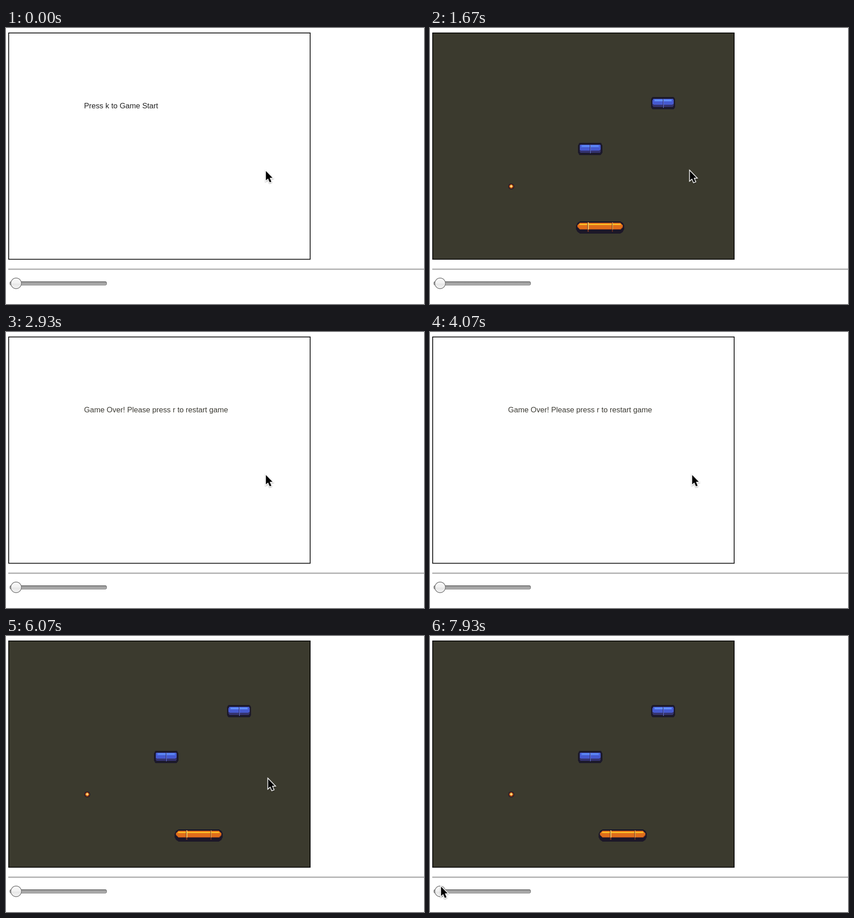
Write an HTML page that moves like this. It is 921 px wide and 608 px high and loops after 8 s.

```html
<!DOCTYPE html>
<html lang="en">
<head>
<meta charset="utf-8">
<title>Block game</title>
<style>
html, body { margin: 0; width: 100%; height: 100%; overflow: hidden; background: #fff; }
svg { display: block; width: 921px; height: 608px; }
text { font: 16.6px "Liberation Sans", Arial, sans-serif; filter: blur(.35px); }
.art { shape-rendering: crispEdges; }
#start, #game, #over, #paddle, #ball, #cursor { animation: 8s step-end infinite; }

#start { animation-name: start; }
#game { animation-name: game; }
#over { animation-name: over; }
#paddle { animation-name: paddle; }
#ball { animation-name: ball; }
#cursor { animation-name: cursor; }

@keyframes start {
  0% { visibility: visible; }
  .875%, 100% { visibility: hidden; }
}
@keyframes game {
  0%, 36.625% { visibility: hidden; }
  .875%, 55.875%, 100% { visibility: visible; }
}
@keyframes over {
  0%, 55.875%, 100% { visibility: hidden; }
  36.625% { visibility: visible; }
}
/* one key press moves the paddle 49.8px */
@keyframes paddle {
  0% { transform: translateX(0); }
  12.5% { transform: translateX(49.8px); }
  13.375% { transform: translateX(99.6px); }
  20.875% { transform: translateX(149.4px); }
  21.625% { transform: translateX(199.2px); }
  22.5% { transform: translateX(249px); }
  25% { transform: translateX(199.2px); }
  25.875% { transform: translateX(149.4px); }
  26.625% { transform: translateX(99.6px); }
  27.5% { transform: translateX(49.8px); }
  28.375% { transform: translateX(0); }
  29.125% { transform: translateX(-49.8px); }
  30% { transform: translateX(-99.6px); }
  30.875% { transform: translateX(-149.4px); }
  31.625% { transform: translateX(-164.8px); }
  36.625% { transform: translateX(0); }
  71.625% { transform: translateX(49.8px); }
  72.5% { transform: translateX(99.6px); }
  74.125% { transform: translateX(149.4px); }
  75%, 100% { transform: translateX(199.2px); }
}
@keyframes ball {
  0% { transform: none; }
  35.875% { transform: translate(49.8px, 49.8px); }
  36.625%, 100% { transform: none; }
}
@keyframes cursor {
  0% { transform: translate(572.6px, 315px); }
  49.125% { transform: translate(574px, 315px); }
  50% { transform: translate(576px, 315px); }
  50.875% { transform: translate(577.6px, 315px); }
  87.5% { transform: translate(570px, 320px); }
  88.375% { transform: translate(540px, 346px); }
  89.125% { transform: translate(478px, 396px); }
  90% { transform: translate(395px, 453px); }
  90.875% { transform: translate(308px, 503px); }
  91.625% { transform: translate(228px, 537px); }
  92.5% { transform: translate(163px, 557px); }
  93.375% { transform: translate(112px, 565px); }
  94.125% { transform: translate(76px, 566px); }
  95.875% { transform: translate(54px, 560px); }
  97.5% { transform: translate(40px, 553px); }
  98.375% { transform: translate(29px, 552px); }
  99.125%, 100% { transform: translate(24.3px, 552px); }
}
</style>
</head>
<body>
<svg viewBox="0 0 921 608" xmlns="http://www.w3.org/2000/svg">
  <defs>
    <linearGradient id="track" x2="0" y2="1">
      <stop offset="0" stop-color="#858585"/>
      <stop offset="1" stop-color="#c2c2c2"/>
    </linearGradient>
    <linearGradient id="knob" x2="0" y2="1">
      <stop offset="0" stop-color="#fafafa"/>
      <stop offset=".5" stop-color="#f1f1f1"/>
      <stop offset=".52" stop-color="#e6e6e6"/>
      <stop offset="1" stop-color="#f4f4f4"/>
    </linearGradient>
    <filter id="shade" x="-50%" y="-50%" width="200%" height="200%">
      <feDropShadow dx="0" dy="1.2" stdDeviation="1.1" flood-opacity=".4"/>
    </filter>
    <!-- sprites on a 16-unit-high pixel grid -->
    <g id="block" class="art">
      <path d="M2 0H30L31 1 32 3V13L31 15 30 16H2L1 15 0 13V3L1 1Z" fill="#1c192a"/>
      <path d="M3 2H29L30 4V11L29 13H3L2 11V4Z" fill="#35336f"/>
      <path d="M3 2H29L30 4V9L28 10H4L2 9V4Z" fill="#4659cf"/>
      <path d="M4 3H28V6H4Z" fill="#4f73ea"/>
      <path d="M5 3.5H27V5H5Z" fill="#6491f8"/>
      <path d="M15.4 2H16V14H15.4Z" fill="#292657"/>
      <path d="M16 2H16.7V14H16Z" fill="#6f83df"/>
    </g>
    <g id="bar" class="art">
      <path d="M5 0H59L62 2 64 6V10L62 14 59 16H5L2 14 0 10V6L2 2Z" fill="#1c1728"/>
      <path d="M5 2H59L62 5V8L59 11H5L2 8V5Z" fill="#9e451d"/>
      <path d="M5 2H59L62 5V7L59 10H5L2 7V5Z" fill="#df6d1b"/>
      <path d="M5 3H59L61 5H3Z" fill="#f49a1d"/>
      <path d="M5 3.4H59V5H5Z" fill="#ffca2a"/>
      <path d="M15 1.5H15.9V14H15ZM47.3 1.5H48.2V14H47.3Z" fill="#55241e"/>
      <path d="M15.9 1.5H16.7V11H15.9ZM48.2 1.5H49V11H48.2Z" fill="#ffd66a"/>
      <path d="M15.9 11H16.7V14H15.9ZM48.2 11H49V14H48.2Z" fill="#7c3a22"/>
    </g>
  </defs>

  <text id="start" x="172" y="177" fill="#222">Press k to Game Start</text>
  <text id="over" x="172" y="177" fill="#3c3b34">Game Over! Please press r to restart game</text>

  <g id="game">
    <rect x="6" y="11" width="664" height="498" fill="#3b3a2e"/>
    <use href="#block" transform="translate(487 152.3) scale(1.66)"/>
    <use href="#block" transform="translate(326.4 253.2) scale(1.66)"/>
    <g id="ball">
      <circle cx="179" cy="349" r="6.6" fill="#2a1a26"/>
      <path d="M177 344.2H181L183.8 347V351L181 353.8H177L174.2 351V347Z" fill="#8e3d1d"/>
      <path d="M179 344.5 183.3 348.7 179 353 174.7 348.7Z" fill="#f28a1c"/>
      <path d="M179 345.8 181.7 348.5 179 351.2 176.3 348.5Z" fill="#ffe08a"/>
    </g>
    <g id="paddle">
      <use href="#bar" transform="translate(172.3 426) scale(1.66)"/>
    </g>
  </g>
  <rect x="5.9" y="10.9" width="664.3" height="498.6" fill="none" stroke="#000" stroke-width="1.7"/>

  <rect x="5" y="530.3" width="916" height="1.7" fill="#929292"/>
  <rect x="5" y="532" width="916" height="1.5" fill="#e6e6e6"/>
  <rect x="8.6" y="558.6" width="213" height="7.8" rx="3.5" fill="url(#track)" stroke="#777" stroke-width="1.2"/>
  <circle cx="22.3" cy="562.5" r="11.7" fill="url(#knob)" stroke="#777" stroke-width="1.4"/>

  <g id="cursor">
    <path d="M0 0V20.8L4.7 16.4 8.4 25 12 23.5 8.4 15H14.5Z" stroke="#fff" stroke-width="3.2" paint-order="stroke" filter="url(#shade)"/>
  </g>
</svg>
</body>
</html>
```
